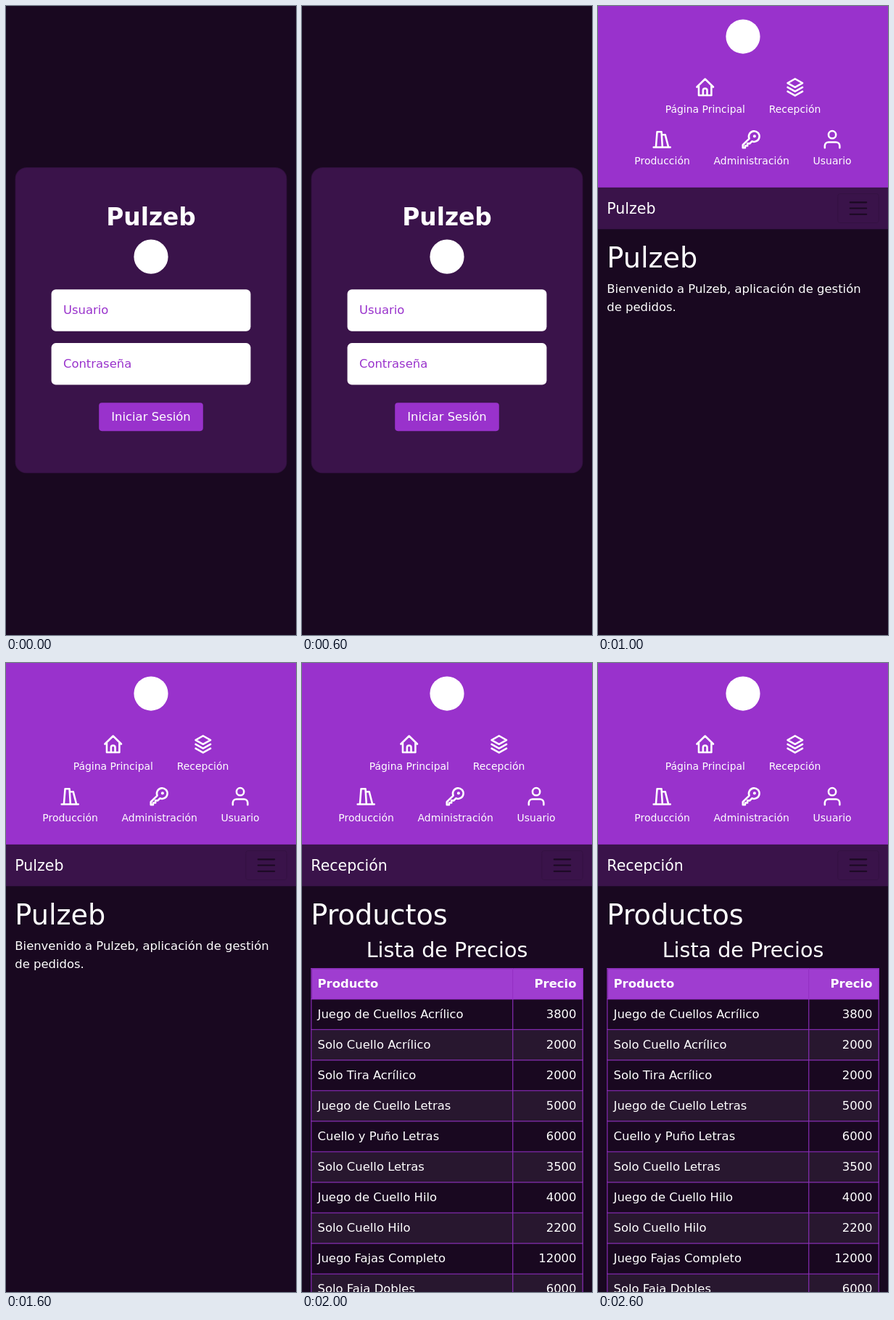
Animation of 400x866 px, one loop 3 s. Source, as an HTML page:

```html
<!DOCTYPE html>
<html lang="es">
<head>
<meta charset="utf-8">
<title>Gestión de pedidos</title>
<style>
  :root { --night: #190820; --plum: #3a134a; --orchid: #9932cc; }
  * { box-sizing: border-box; margin: 0; padding: 0; }
  html, body { width: 100%; height: 100%; overflow: hidden; background: var(--night); }
  body { position: relative; font: 16px/24px "DejaVu Sans", sans-serif; color: #fff; }
  #stage {
    position: absolute; left: 0; top: 0; width: 390px; height: 845px; overflow: hidden;
    transform: scale(calc(400 / 390)); transform-origin: 0 0;
  }
  .scene { position: absolute; inset: 0; opacity: 0; }
  .logo { position: absolute; left: 172px; width: 46px; height: 46px; border-radius: 50%; background: #fff; }

  #login { transform: translateY(-.5px); }
  .card {
    position: absolute; left: 12px; top: 217px; width: 366px; height: 411px;
    border: 1px solid rgba(0, 0, 0, .175); border-radius: 16px; background: var(--plum);
  }
  .title { position: absolute; top: 265px; width: 100%; text-align: center; font: bold 32px/38.4px "DejaVu Sans", sans-serif; }
  .field {
    position: absolute; left: 61px; width: 268px; height: 56px; padding: 16px;
    border-radius: 6px; background: #fff; color: var(--orchid);
  }
  .button {
    position: absolute; left: 124.7px; top: 533px; width: 140.6px; height: 38px;
    border-radius: 4px; background: var(--orchid); text-align: center; line-height: 38px;
  }

  header { position: absolute; top: 0; width: 100%; height: 244px; background: var(--orchid); }
  .links { position: absolute; top: 85.5px; width: 100%; font-size: 13.6px; line-height: 20.4px; }
  .links div { display: flex; justify-content: center; }
  .links span { padding: 8px 16px; white-space: nowrap; }
  .links svg { display: block; width: 30px; height: 30px; margin: 0 auto 4px; }
  .links path { fill: none; stroke: #fff; stroke-width: 2; stroke-linecap: round; stroke-linejoin: round; }
  nav, #home, #prices { transform: translateY(.6px); }
  nav { position: absolute; top: 243px; width: 100%; height: 56px; background: var(--plum); }
  .toggler { position: absolute; left: 322px; top: 8px; width: 56px; height: 40px; border: 1px solid rgba(0, 0, 0, .1); border-radius: 4px; }
  .toggler svg { position: absolute; left: 12px; top: 4px; width: 30px; height: 30px; }
  .brand { position: absolute; left: 12px; top: 256px; font-size: 20px; line-height: 30px; }
  main { position: absolute; left: 12px; top: 315px; width: 366px; }
  h1, h2 { font-weight: 400; line-height: 1.2; margin-bottom: 8px; }
  h1 { font-size: 37.27px; }
  h2 { font-size: 27.85px; text-align: center; }
  table { width: 366px; table-layout: fixed; border-collapse: collapse; }
  th, td { padding: 8px; border: 1px solid var(--orchid); text-align: left; white-space: nowrap; }
  th:first-child { width: 270.5px; }
  tr > :last-child { text-align: right; }
  th { background: #9f3dd0; }
  tbody tr:nth-child(even) { background: #28172f; }
</style>
</head>
<body>
<div id="stage">
  <section class="scene" id="login">
    <div class="card"></div>
    <div class="title">Pulzeb</div>
    <i class="logo" style="top:314px"></i>
    <div class="field" style="top:381px">Usuario</div>
    <div class="field" style="top:453px">Contraseña</div>
    <div class="button">Iniciar Sesión</div>
  </section>

  <section class="scene" id="frame">
    <header>
      <i class="logo" style="top:18px"></i>
      <div class="links" id="links"></div>
    </header>
    <nav>
      <div class="toggler">
        <svg viewBox="0 0 30 30"><path d="M4 7h22M4 15h22M4 23h22" stroke="#000" stroke-opacity=".55" stroke-width="2" stroke-linecap="round"/></svg>
      </div>
    </nav>
  </section>

  <section class="scene" id="home">
    <div class="brand">Pulzeb</div>
    <main>
      <h1>Pulzeb</h1>
      <p>Bienvenido a Pulzeb, aplicación de gestión<br>de pedidos.</p>
    </main>
  </section>

  <section class="scene" id="prices">
    <div class="brand">Recepción</div>
    <main>
      <h1>Productos</h1>
      <h2>Lista de Precios</h2>
      <table>
        <thead><tr><th>Producto</th><th>Precio</th></tr></thead>
        <tbody id="rows"></tbody>
      </table>
    </main>
  </section>
</div>

<script>
  const $ = id => document.getElementById(id);

  const icons = {
    home: 'M3.2 11.8L12 3.2l8.8 8.6M5.2 10v10.8h13.6V10M9.8 20.8v-5.3a2.2 2.2 0 0 1 4.4 0v5.3',
    layers: 'M12 3l8 4.5-8 4.5-8-4.5zM4 12l8 4.5 8-4.5M4 16.5l8 4.5 8-4.5',
    spools: 'M3 20.5h18M5.5 20.5L6.8 4h4.7l1 16.5M12 7h3.5L19 20.5',
    key: 'M9.9 11.2A5.7 5.7 0 1 1 12.8 14.1L10.5 16.5H8V19H5.5v2H3v-3zM15 8.6a.6.6 0 1 0 1.2 0a.6.6 0 1 0-1.2 0',
    user: 'M20 21v-2a4 4 0 0 0-4-4H8a4 4 0 0 0-4 4v2M8 7a4 4 0 1 0 8 0a4 4 0 1 0-8 0'
  };

  const menu = [
    [['home', 'Página Principal'], ['layers', 'Recepción']],
    [['spools', 'Producción'], ['key', 'Administración'], ['user', 'Usuario']]
  ];

  const products = [
    ['Juego de Cuellos Acrílico', 3800],
    ['Solo Cuello Acrílico', 2000],
    ['Solo Tira Acrílico', 2000],
    ['Juego de Cuello Letras', 5000],
    ['Cuello y Puño Letras', 6000],
    ['Solo Cuello Letras', 3500],
    ['Juego de Cuello Hilo', 4000],
    ['Solo Cuello Hilo', 2200],
    ['Juego Fajas Completo', 12000],
    ['Solo Faja Dobles', 6000]
  ];

  const link = ([icon, label]) =>
    `<span><svg viewBox="0 0 24 24"><path d="${icons[icon]}"/></svg>${label}</span>`;

  $('links').innerHTML = menu.map(row => `<div>${row.map(link).join('')}</div>`).join('');
  $('rows').innerHTML = products.map(([name, price]) => `<tr><td>${name}</td><td>${price}</td></tr>`).join('');

  // Visibility of each scene in the three one-second steps.
  const steps = {
    login: [1, 0, 0],
    frame: [0, 1, 1],
    home: [0, 1, 0],
    prices: [0, 0, 1]
  };

  for (const [id, shown] of Object.entries(steps)) {
    const keys = shown.map((opacity, i) => ({ opacity, offset: i / 3, easing: 'step-end' }));
    keys.push({ opacity: shown[2], offset: 1 });
    $(id).animate(keys, { duration: 3000, iterations: Infinity });
  }
</script>
</body>
</html>
```
